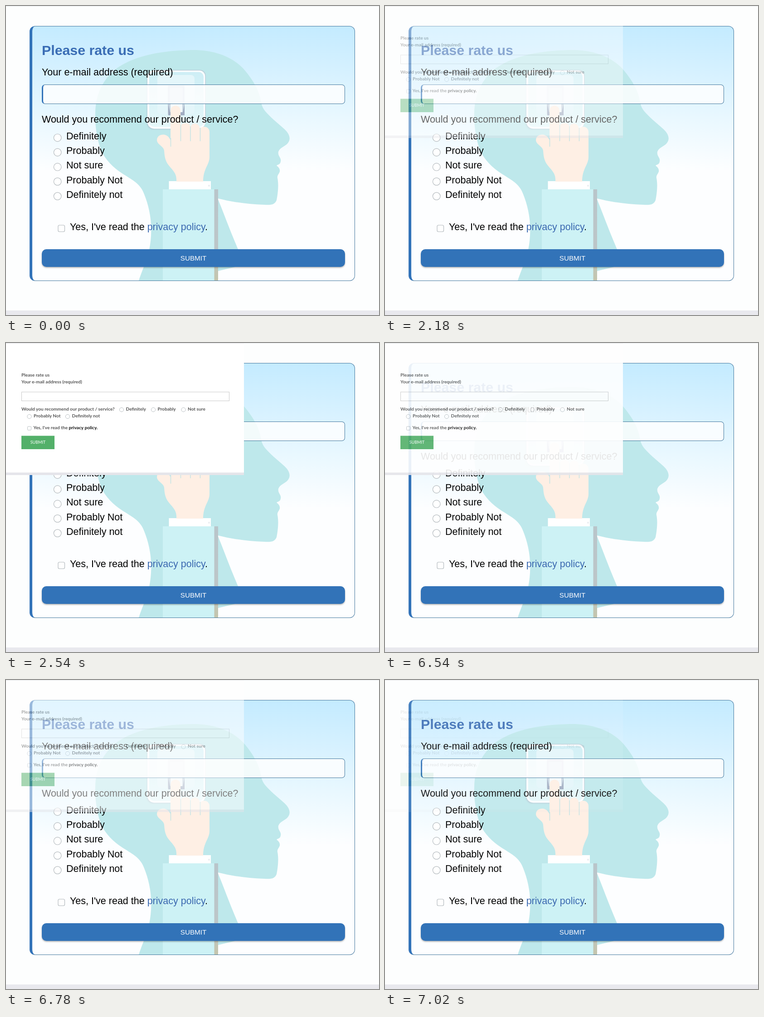
Recreate the animation shown at these times as an HTML page. Size 823 by 681 pixels, loop 7080 ms.

```html
<!DOCTYPE html>
<html lang="en">
<head>
<meta charset="utf-8">
<title>Rating form before and after</title>
<style>
  html, body { margin: 0; width: 100%; height: 100%; overflow: hidden; background: #fdfefe; }
  svg, .box { position: absolute; box-sizing: border-box; }
  svg { left: 0; top: 0; }
  .card { left: 52px; top: 44px; width: 718px; height: 562px; border: 1.5px solid #45799f;
    border-left: 6px solid #3273b9; border-radius: 12px;
    background: linear-gradient(#c4ebff, #d6f1ff 18%, #e9f8ff 36%, #fdfeff 57%); }
  .field { left: 79px; top: 173px; width: 669px; height: 43px; border: 1.5px solid #45799f;
    border-left: 3px solid #3273b9; border-radius: 7px; background: rgba(255, 255, 255, .82); }
  .button { left: 79px; top: 536px; width: 669px; height: 39px; border-radius: 10px;
    background: #3273b8; box-shadow: 0 2px 3px rgba(0, 0, 0, .28); }
  .styled { font: 21.5px "Liberation Sans", Arial, sans-serif; }
  .plain { font: 700 10.15px Lato, sans-serif; fill: #555; }
  .mark { fill: #fff; stroke: #b4babe; stroke-width: 1.2; }
  .plain .mark { stroke-width: .9; }
</style>
</head>
<body>
<div class="box card"></div>

<svg width="823" height="681" viewBox="0 0 823 681">
  <defs>
    <linearGradient id="cuffShade" x1="0" y1="0" x2="0" y2="1">
      <stop offset="0" stop-color="#b9c5ca"/><stop offset=".65" stop-color="#bcc6c8"/>
      <stop offset="1" stop-color="#c4c5ad"/>
    </linearGradient>
    <linearGradient id="plate" x1="0" y1="0" x2="0" y2="1">
      <stop offset="0" stop-color="#cdeef5"/><stop offset="1" stop-color="#e6f8fa"/>
    </linearGradient>
    <filter id="soft" x="-20%" y="-20%" width="140%" height="140%"><feGaussianBlur stdDeviation="1.6"/></filter>
  </defs>
  <path d="M0 .5H823" stroke="#e8eaed"/>
  <path d="M0 671H823V681H0Z" fill="#e9e9ee"/>

  <!-- head -->
  <path fill="#bee8eb" d="M293 605C303 574 318 550 320 505C322 470 315 440 305 415
    C298 396 287 388 266 375C240 360 221 341 211 321C201 296 196 265 197 235
    C198 195 213 161 246 136C290 107 350 97 420 97C470 99 505 116 528 143
    C546 165 560 188 563 213C566 228 575 236 591 251L614 271C626 282 629 293 622 302
    C617 309 605 311 601 321C599 331 608 334 606 343C605 350 599 349 597 352
    C602 355 605 360 604 365C602 371 598 373 599 379C602 394 600 413 597 428
    C593 438 585 439 570 438C530 437 495 431 467 424C480 455 493 492 512 536
    Q522 563 514 573L468 584V605Z"/>

  <!-- switch -->
  <rect x="311" y="144" width="127" height="128" rx="14" fill="#aebccb" opacity=".65" filter="url(#soft)"/>
  <rect x="314" y="143.500" width="124" height="125" rx="13" fill="url(#plate)" stroke="#fbfdff" stroke-width="4"/>
  <path d="M322 141.500H427Q440 142 440 155V250" fill="none" stroke="#bccdd8" stroke-width="1.300"/>
  <rect x="334" y="152" width="82" height="86" rx="8" fill="#e4f6fa"/>
  <rect x="357" y="175" width="37" height="65" rx="2" fill="#c8d6e2"/>
  <rect x="361" y="180" width="29" height="35" fill="#d9e5ed"/>
  <path d="M358 216V241H394V216L390 234H362Z" fill="#a1adc2"/>
  <rect x="363" y="212" width="26" height="22" fill="#f4fafc"/>

  <!-- arm -->
  <path d="M346 404H460V605H346Z" fill="#cdf2f5"/>
  <path d="M459.500 404H468V605H459.500Z" fill="url(#cuffShade)"/>
  <path d="M359.500 386H452V404H359.500Z" fill="#fff"/>
  <circle cx="448" cy="396" r="2" fill="#e9edf0"/>
  <path fill="#feefe4" d="M376 387C377 373 372 366 363 356C352 344 350 335 349 319
    C348 309 334 306 333 296C333 286 342 282 351 284C358 286 360 291 363 295V231
    Q364 220 374 219.500Q384 220 385 231V265Q388 258 396 258Q405 258 407 266
    Q410 259 418 259Q426 260 428 271Q431 266 438 266Q448 267 449 277V333
    C449 350 435 358 435 387Z"/>
  <path d="M363.500 291V310M385.500 262V298M407 265V298M428.500 268V298" stroke="#c8e4e4" stroke-width="1.600"/>
</svg>

<div class="box field"></div>
<div class="box button"></div>

<svg width="823" height="681" viewBox="0 0 823 681">
  <g class="styled">
    <text x="79" y="108" font-size="30.300" font-weight="700" fill="#3a6db5">Please rate us</text>
    <text x="79" y="153">Your e-mail address (required)</text>
    <text x="79" y="257">Would you recommend our product / service?</text>
    <g id="styledChoices"></g>
    <rect class="mark" x="115" y="483" width="14.500" height="14.500" rx="3"/>
    <text x="141" y="494">Yes, I've read the <tspan fill="#3a68b0">privacy policy</tspan>.</text>
    <text x="413.500" y="561" font-size="15.200" fill="#fff" text-anchor="middle">SUBMIT</text>
  </g>

  <g class="plain" id="plainForm">
    <path d="M0 0H525V291H0Z" fill="#fff"/>
    <path d="M0 .5H525" stroke="#dfe1e4"/>
    <path d="M0 285.500H525V291H0Z" fill="#e5e5ea"/>
    <text x="34" y="73.500">Please rate us</text>
    <text x="34" y="88.500">Your e-mail address (required)</text>
    <rect x="34.500" y="108" width="458" height="19.500" fill="#fff" stroke="#c9c9c9"/>
    <text x="34" y="149">Would you recommend our product / service?</text>
    <g id="plainChoices"></g>
    <rect class="mark" x="47.500" y="184" width="8" height="8" rx="1.500"/>
    <text x="60.500" y="190">Yes, I've read the <tspan fill="#111">privacy policy.</tspan></text>
    <path d="M34 204.500H107V234H34Z" fill="#53b069"/>
    <text x="70.500" y="222" font-size="9" font-weight="400" fill="#fff" text-anchor="middle">SUBMIT</text>
  </g>
</svg>

<script>
  const LOOP = 7080, STEP = 60, FADE_IN = 2000, FADE_OUT = 6540;
  const byId = id => document.getElementById(id);
  const choices = ["Definitely", "Probably", "Not sure", "Probably Not", "Definitely not"];
  const plainSpots = [[255, 147], [325, 147], [391.5, 147], [51.5, 162], [136, 162]];

  const choice = (label, cx, cy, r, textX, textY) =>
    `<circle class="mark" cx="${cx}" cy="${cy}" r="${r}"/><text x="${textX}" y="${textY}">${label}</text>`;

  byId("styledChoices").innerHTML = choices.map((label, i) =>
    choice(label, 113.7, 290.3 + i * 32.2, 8.3, 133, 294 + i * 32.2)).join("");
  byId("plainChoices").innerHTML = choices.map((label, i) => {
    const [x, y] = plainSpots[i];
    return choice(label, x, y, 4.6, x + 9.5, y + 2);
  }).join("");

  // The plain form fades in ten hard steps of 10%.
  function opacityAt(t) {
    const steps = start => Math.floor((t - start) / STEP) + 1;
    if (t < FADE_IN) return 0;
    if (t < FADE_OUT) return Math.min(1, steps(FADE_IN) / 10);
    return Math.max(0, 1 - steps(FADE_OUT) / 10);
  }

  const start = performance.now();
  function draw() {
    byId("plainForm").setAttribute("opacity", opacityAt((performance.now() - start) % LOOP));
    requestAnimationFrame(draw);
  }
  draw();
</script>
</body>
</html>
```
